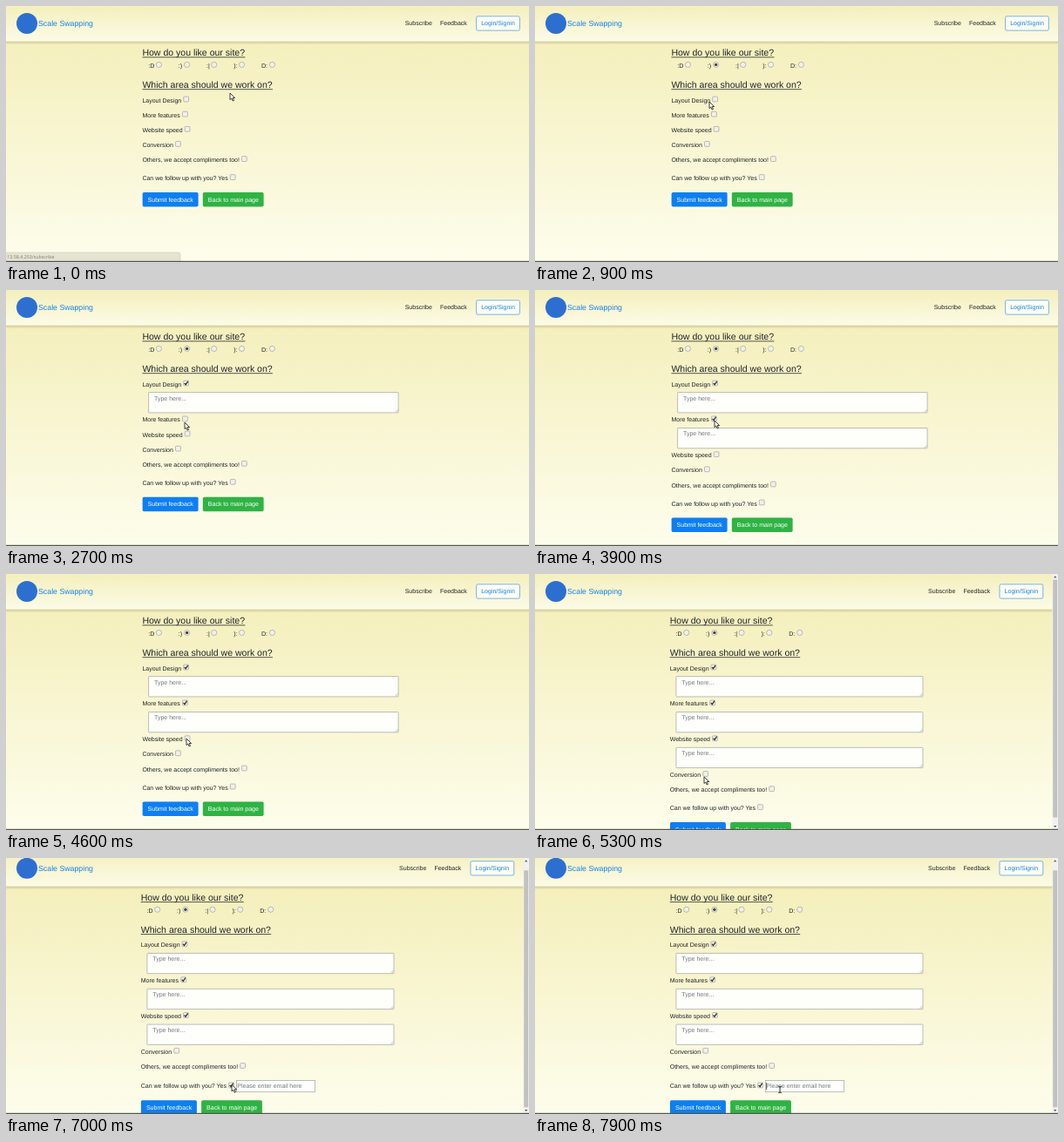
An HTML page for the animation above (8 s loop, 600 px wide and 294 px high).

```html
<!DOCTYPE html>
<html lang="en">
<head>
<meta charset="utf-8">
<title>Feedback form</title>
<style>
  html, body { margin: 0; width: 100%; height: 100%; overflow: hidden; background: #fbf9df; }
  svg { display: block; width: 600px; height: 294px; }
  text { font: 7.03px "Liberation Sans", Arial, sans-serif; fill: #212529; text-rendering: geometricPrecision; white-space: pre; }
  .title { font-size: 10.54px; }
  .rule { fill: #212529; }
  .brand { font-size: 8.79px; fill: #1583e8; }
  .light { fill: #fff; }
  .blue { fill: #1583e8; }
  .hint { fill: #747a80; }
  .url { font: 5.3px "Open Sans", "Noto Sans", sans-serif; fill: #77776f; }
  .ctl { fill: #f1f0ea; stroke: #a3a39c; stroke-width: .7; }
  .field { fill: #fefefb; stroke: #adaea8; stroke-width: .8; }
  .tick { fill: none; stroke: #333; stroke-width: 1.3; }
  .grip { fill: none; stroke: #999; stroke-width: .5; }
</style>
</head>
<body>
<svg id="stage" viewBox="0 0 600 294">
  <defs>
    <linearGradient id="bodyFill" x2="0" y2="1">
      <stop stop-color="#f4efbb"/><stop offset="1" stop-color="#fdfdec"/>
    </linearGradient>
    <linearGradient id="navFill" x2="0" y2="1">
      <stop stop-color="#f4efbd"/><stop offset="1" stop-color="#fcfbe6"/>
    </linearGradient>
    <linearGradient id="shade" x2="0" y2="1">
      <stop stop-color="#77724a" stop-opacity=".32"/><stop offset="1" stop-color="#77724a" stop-opacity="0"/>
    </linearGradient>
  </defs>
  <rect y="33" width="600" height="261" fill="url(#bodyFill)"/>
  <g id="page">
    <rect y="40.5" width="600" height="4" fill="url(#shade)"/>
    <rect width="600" height="40.5" fill="url(#navFill)"/>
    <circle cx="24" cy="20" r="12" fill="#2d6fd0"/>
    <text class="brand" x="37" y="23.1">Scale Swapping</text>
    <g id="links">
      <text x="457.7" y="22.3">Subscribe</text>
      <text x="498" y="22.3">Feedback</text>
      <rect x="539.6" y="11.8" width="49.8" height="16.3" rx="1.8" fill="#fdfdf4" stroke="#3d98ea" stroke-width=".7"/>
      <text class="blue" x="545.2" y="22.3">Login/Signin</text>
    </g>
    <g id="form"></g>
  </g>
  <g id="bar">
    <rect x="593.4" width="6.6" height="294" fill="#f1f1f0"/>
    <rect id="thumb" x="594.2" width="5" fill="#c1c1c0"/>
    <path d="M595 4.3h3.4l-1.7-2zM595 289h3.4l-1.7 2z" fill="#505050"/>
  </g>
  <g id="status">
    <path d="M0 283H198q2 0 2 2V294H0z" fill="#e5e4d3" stroke="#c5c4b4" stroke-width=".5"/>
    <text class="url" x="1.3" y="290">13.58.4.253/subscribe</text>
  </g>
  <rect y="292.8" width="600" height="1.2" fill="#55554c"/>
  <g id="pointer">
    <path id="arrow" d="M0 0V7.6L1.8 6L3.1 9L4.5 8.4L3.2 5.5H5.6z" fill="#fff" stroke="#111" stroke-width=".8"/>
    <path id="beam" d="M-1.8 -3.8Q0 -3.8 0 -2.8Q0 -3.8 1.8 -3.8M0 -2.8V2.8M-1.8 3.8Q0 3.8 0 2.8Q0 3.8 1.8 3.8" fill="none" stroke="#111" stroke-width=".9"/>
  </g>
</svg>
<script>
const $ = id => document.getElementById(id);
const LOOP = 8000, STEP = 100;
const TEXT_X = 156.4, GROW = 23.7;
const SCROLLBAR_AT = 4800, SCROLL_AT = 5800, EMAIL_AT = 7000, FOCUS_AT = 7600;
const RADIO_AT = 500, STATUS_OFF = 300;

const text = (x, y, s, cls = '') => `<text class="${cls}" x="${x}" y="${y}">${s}</text>`;
const heading = (y, s, w) => text(TEXT_X, y, s, 'title') +
  `<rect class="rule" x="${TEXT_X}" y="${y + 1.1}" width="${w}" height=".75"/>`;
const radio = ([label, x, cx]) => text(x, 71, label) +
  `<circle class="ctl" cx="${cx}" cy="67.4" r="3.1"/>`;
const button = (x, w, color, label) =>
  `<rect x="${x}" y="214" width="${w}" height="16.6" rx="1.8" fill="${color}"/>` +
  text(x + 6, 224.7, label, 'light');

// Each row: label, baseline, checkbox centre, time of its click
const rows = [
  ['Layout Design', 110.6, 206.6, 2000],
  ['More features', 127.8, 205.4, 3700],
  ['Website speed', 144.9, 208.1, SCROLLBAR_AT],
  ['Conversion', 162, 197.4, Infinity],
  ['Others, we accept compliments too!', 179.2, 273.3, Infinity],
  ['Can we follow up with you? Yes', 200.2, 260.2, EMAIL_AT]
];
const LAST = rows.length - 1;

function rowMarkup([label, y, cx], i) {
  const cy = y - 3.6;
  const extra = i < 3
    ? `<rect class="field area" x="163.6" y="${y + 7}" width="286.5" height="23.3" rx=".5"/>` +
      text(170, y + 15.9, 'Type here...', 'hint') +
      `<path class="grip" d="M446.5 ${y + 29.6}l3-3m-1.4 3l1.4-1.4"/>`
    : i === LAST
      ? `<rect class="field" x="266.3" y="${y - 9}" width="89.8" height="13.2"/>` +
        text(267, y, 'Please enter email here', 'hint') +
        `<path id="caret" d="M267.2 ${y - 6.4}v8" stroke="#222" stroke-width=".6"/>`
      : '';
  return `<g class="row">${text(TEXT_X, y, label)}
    <rect class="ctl" x="${cx - 2.9}" y="${cy - 2.9}" width="5.8" height="5.8" rx=".8"/>
    <g class="on"><path class="tick" d="M${cx - 1.9} ${cy}l1.5 1.7l2.6-3.9"/>${extra}</g></g>`;
}

$('form').innerHTML =
  heading(57.4, 'How do you like our site?', 118) +
  [[':D', 163.2, 175.4], [':)', 197.8, 207.6], [':|', 230, 238.7], ['):', 261.2, 270.5], ['D:', 293, 305.4]].map(radio).join('') +
  '<circle id="dot" cx="207.6" cy="67.4" r="1.7" fill="#444"/>' +
  heading(94.3, 'Which area should we work on?', 149.5) +
  rows.map(rowMarkup).join('') +
  `<g id="buttons">${button(156.6, 64, '#0d7ff2', 'Submit feedback')}${button(225.8, 69.8, '#2fb344', 'Back to main page')}</g>`;

const rowEls = document.querySelectorAll('.row');
const areas = document.querySelectorAll('.area');

// Pointer stops: time, x, y
const path = [
  [0, 257, 100], [200, 248, 92], [400, 209, 70], [600, 207, 69], [900, 200, 110],
  [1200, 203, 108], [1500, 206, 107], [2000, 206, 107], [2300, 206, 125], [2700, 205, 152],
  [3600, 206, 150], [3900, 206, 150], [4300, 207, 178], [4600, 207, 189], [4800, 207, 189],
  [5000, 204, 203], [5300, 194, 233], [6100, 198, 231], [6500, 215, 240], [6900, 259, 260],
  [7200, 259, 261], [7500, 281, 265], [7900, 281, 266]
];

function pointerAt(t) {
  const i = path.findIndex(p => p[0] > t);
  if (i < 0) return path[path.length - 1].slice(1);
  const [a, b] = [path[i - 1], path[i]];
  const k = (t - a[0]) / (b[0] - a[0]);
  return [1, 2].map(n => a[n] + (b[n] - a[n]) * k);
}

const show = (el, on) => { el.style.display = on ? '' : 'none'; };
const move = (el, x, y) => el.setAttribute('transform', `translate(${x} ${y})`);

function draw(t) {
  const narrow = t >= SCROLLBAR_AT, email = t >= EMAIL_AT;
  const scroll = t >= SCROLL_AT ? 8.2 : 0;
  move($('page'), 0, -scroll);
  move($('links'), narrow ? -6.6 : 0, 0);
  move($('form'), narrow ? -1.7 : 0, 0);

  let down = 0;
  rows.forEach(([, , , click], i) => {
    const on = t >= click;
    if (i === LAST && email) down += 1.4;
    move(rowEls[i], 0, down);
    show(rowEls[i].querySelector('.on'), on);
    if (i < 3 && on) down += GROW;
  });
  move($('buttons'), 0, down);
  areas.forEach(a => a.setAttribute('width', narrow ? 283.1 : 286.5));
  document.querySelectorAll('.grip').forEach(g => move(g, narrow ? -3.4 : 0, 0));

  show($('dot'), t >= RADIO_AT);
  show($('caret'), t >= FOCUS_AT);
  show($('status'), t < STATUS_OFF);
  show($('bar'), narrow);
  $('thumb').setAttribute('y', 6.6 + scroll * .93);
  $('thumb').setAttribute('height', email ? 272 : 273);

  const [x, y] = pointerAt(t);
  const typing = email && x > 265;
  move($('pointer'), x, y);
  show($('arrow'), !typing);
  show($('beam'), typing);
}

const start = performance.now();
function tick() {
  const t = (performance.now() - start) % LOOP;
  draw(Math.floor(t / STEP) * STEP);
  requestAnimationFrame(tick);
}
tick();
</script>
</body>
</html>
```
